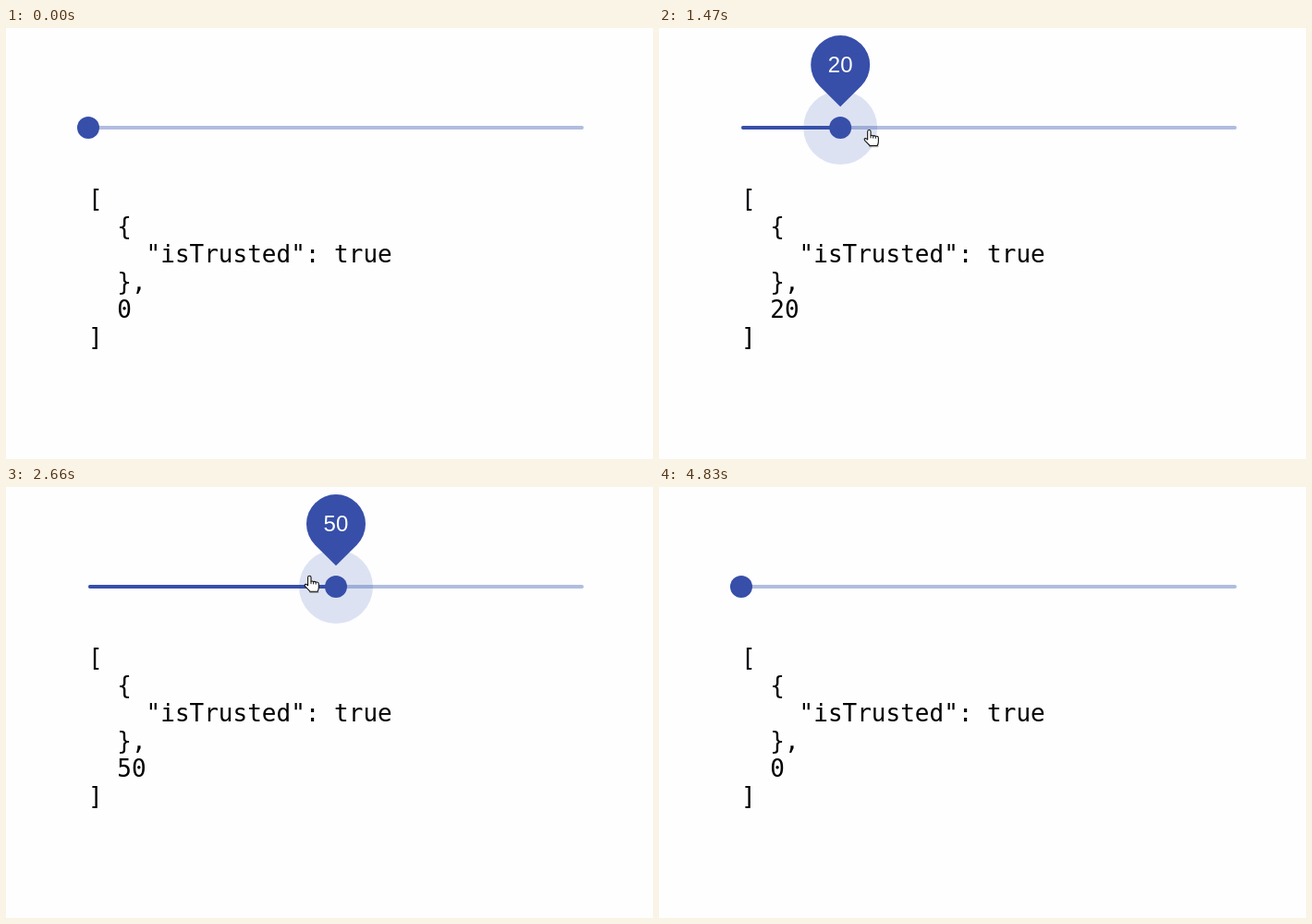
An HTML page that plays this animation: 700x467 px, repeating every 5.46 s.

```html
<!DOCTYPE html>
<html lang="en">
<head>
<meta charset="utf-8">
<title>Slider with value label</title>
<style>
  html, body { margin: 0; width: 100%; height: 100%; overflow: hidden; background: #fefdff; }
  svg { display: block; width: 700px; height: 467px; }
  .accent { fill: #374fa9; }
  .soft { fill: #3456ac; }
  .code { font: 26px "DejaVu Sans Mono", monospace; fill: #000; }
  .label { font: 24px "Liberation Sans", Arial, sans-serif; letter-spacing: .257px; fill: #fff; text-anchor: middle; }
</style>
</head>
<body>
<svg viewBox="0 0 700 467">
  <rect class="soft" x="89" y="106" width="536" height="4" rx="2" opacity=".38"/>
  <rect class="accent" id="track" x="89" y="106" height="4" rx="2"/>
  <g id="thumb">
    <circle class="soft" id="halo" cy="108"/>
    <circle class="accent" cy="108" r="12"/>
    <g id="pin">
      <path class="accent" d="M0 45.25 L-22.63 22.63 A32 32 0 1 1 22.63 22.63 Z"/>
      <text class="label" id="label" x=".1" y="8.3"></text>
    </g>
  </g>
  <g id="code"></g>
  <g id="hand">
    <path d="M7 18.2H15.4" stroke="#000" stroke-opacity=".3" stroke-width="2" stroke-linecap="round"/>
    <path d="M4.5 2.2a1.7 1.7 0 0 1 3.4 0V6.6q1.2-.9 2.6.3q1.4-.8 2.6.4q2.9-.5 3.1 2V13q0 2.5-1.2 4.5H7Q4.6 15 2.2 12.6Q.3 10.6 1.4 9.8Q2.8 9 4.5 11Z"
      fill="#fff" stroke="#111" stroke-width="1.1" stroke-linejoin="round"/>
    <path d="M7.9 6.6V9.4M10.5 6.9V9.6M13.1 7.3V9.8" fill="none" stroke="#111"/>
  </g>
</svg>
<script>
const LOOP = 5460, TICK = 70, LEFT = 89, WIDTH = 536, FADE = 150;
const ENTER = 490, PRESS = 1030, RELEASE = 3320, LEAVE = 3640, BLUR = 4690;
const TIP = 6, LAG = 35;

const $ = id => document.getElementById(id);
const set = (id, attrs) => {
  for (const name in attrs) $(id).setAttribute(name, attrs[name]);
};

const smooth = u => u * u * (3 - 2 * u);
const part = (t, from, to) => Math.max(0, Math.min(1, (t - from) / (to - from)));

// cubic-bezier(.4, 0, .2, 1), solved by bisection
function ease(x) {
  if (x <= 0 || x >= 1) return x <= 0 ? 0 : 1;
  let lo = 0, hi = 1, u = .5;
  for (let i = 0; i < 20; i++) {
    const v = 1 - u;
    if (1.2 * v * v * u + .6 * v * u * u + u ** 3 < x) lo = u; else hi = u;
    u = (lo + hi) / 2;
  }
  return smooth(u);
}

// Goes 0 to 1 at "on" and back at "off"
const toggle = (t, on, off) => ease((t - on) / FADE) - ease((t - off) / FADE);

// The hand enters, drags right, drags back and settles
function pointer(t) {
  const back = ease(part(t, 2375, 3165));
  return {
    x: 121 - 17 * part(t, ENTER, 840) + 465 * smooth(part(t, 1070, 2290))
      - 469 * back - 10 * part(t, 3170, 3220),
    y: 118 - 8 * smooth(part(t, 1070, 1470)) - 27 * back
  };
}

function valueAt(t) {
  if (t < PRESS || t > RELEASE) return 0;
  return 10 * Math.round((pointer(t - LAG).x + TIP - LEFT) / WIDTH * 10);
}

const json = value => JSON.stringify([{ isTrusted: true }, value], null, 2).split("\n");

const lines = json(0).map((line, i) => {
  const el = document.createElementNS("http://www.w3.org/2000/svg", "text");
  el.setAttribute("class", "code");
  el.setAttribute("x", LEFT + line.search(/\S/) * 15.652);
  el.setAttribute("y", 194 + i * 30);
  $("code").append(el);
  return el;
});

function draw(t) {
  const value = valueAt(t), run = WIDTH * value / 100;
  const open = toggle(t, ENTER, LEAVE);
  const focus = toggle(t, ENTER, BLUR);
  const press = toggle(t, PRESS, RELEASE);
  const { x, y } = pointer(t);

  set("track", { width: run });
  set("thumb", { transform: `translate(${LEFT + run})` });
  set("halo", { r: 12 + 16 * focus + 12 * press, opacity: .16 * focus });
  set("pin", {
    transform: `translate(0 ${60 - 20 * open}) scale(${open})`,
    display: open > .01 ? "inline" : "none"
  });
  set("hand", {
    transform: `translate(${x} ${y})`,
    display: t >= ENTER && t < LEAVE + TICK ? "inline" : "none"
  });
  $("label").textContent = value;
  json(value).forEach((line, i) => lines[i].textContent = line.trim());
}

const start = performance.now();
function frame() {
  const t = (performance.now() - start) % LOOP;
  draw(Math.floor(t / TICK) * TICK);
  requestAnimationFrame(frame);
}
frame();
</script>
</body>
</html>
```
